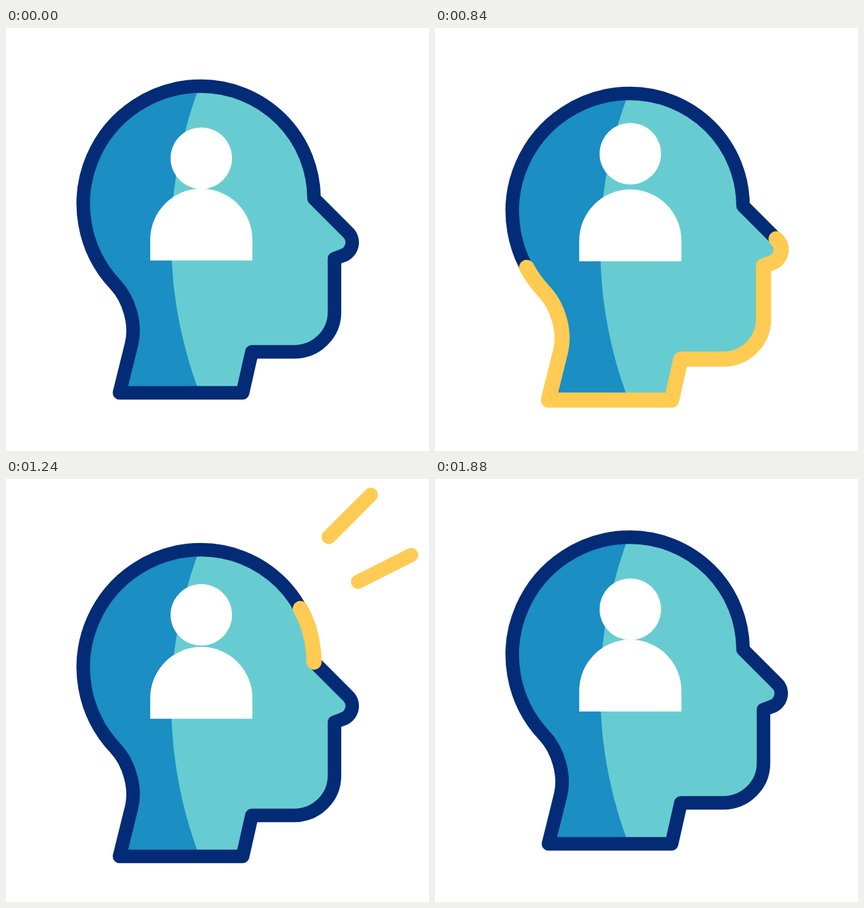
These frames come from a looping animation (640 px wide and 640 px high, 2200 ms). An HTML page:

```html
<!DOCTYPE html>
<html lang="en">
<head>
<meta charset="utf-8">
<title>Open mind</title>
<style>
  html, body { margin: 0; width: 100%; height: 100%; overflow: hidden; background: #fff; }
  svg { display: block; width: 100vw; height: 100vh; }
  .line { fill: none; stroke-linecap: round; stroke-linejoin: round; }
  .navy { stroke: #032b76; stroke-width: 20.5; }
  .glow { stroke: #ffcb52; stroke-width: 23; }
  .ray { stroke: #ffcb52; stroke-width: 21.5; }
</style>
</head>
<body>
<svg viewBox="0 0 640 640">
  <defs>
    <path id="shape" d="M466 258 L517 309 A21 21 0 0 1 508 344.8 L497 349 V430
      A61 60 0 0 1 436 490 H372 L358 552 H171.7 L190 478
      C197 449 187 411 165.3 388 A178 178 0 0 1 295 88 A171 170 0 0 1 466 258 Z"/>
    <clipPath id="inside"><use href="#shape"/></clipPath>
  </defs>
  <g id="skull">
    <use href="#shape" fill="#1b8ec3"/>
    <g clip-path="url(#inside)"><circle cx="901" cy="320" r="651" fill="#67ccd1"/></g>
    <use href="#shape" class="line navy"/>
    <path id="glow" class="line glow"/>
  </g>
  <circle id="face" cx="295.5" cy="197" r="46.5" fill="#fff"/>
  <path id="torso" d="M218.2 351.7 V320.3 A77.3 77.3 0 0 1 372.8 320.3 V351.7 Z" fill="#fff"/>
  <path id="ray1" class="line ray" d="M453 123 L552 24"/>
  <path id="ray2" class="line ray" d="M488 178 L613 115"/>
</svg>
<script>
const LOOP = 2200;
const $ = id => document.getElementById(id);
const [shape, skull, glow, face, torso, ray1, ray2] =
  ['shape', 'skull', 'glow', 'face', 'torso', 'ray1', 'ray2'].map($);
glow.setAttribute('d', shape.getAttribute('d'));

const span = (t, a, b) => Math.min(1, Math.max(0, (t - a) / (b - a)));

// Easing with handles at (x1, 0) and (x2, 1), solved by bisection
function ease(u, x1 = 1 / 3, x2 = 2 / 3) {
  if (u <= 0 || u >= 1) return u;
  let lo = 0, hi = 1, s;
  for (let i = 0; i < 30; i++) {
    s = (lo + hi) / 2;
    const x = 3 * (1 - s) ** 2 * s * x1 + 3 * (1 - s) * s * s * x2 + s ** 3;
    if (x < u) lo = s; else hi = s;
  }
  return s * s * (3 - 2 * s);
}

// Smooth curve through [time, value] keys, without overshoot
function curve(keys, t) {
  const last = keys.length - 1;
  if (t <= keys[0][0]) return keys[0][1];
  if (t >= keys[last][0]) return keys[last][1];
  const rate = i => (keys[i + 1][1] - keys[i][1]) / (keys[i + 1][0] - keys[i][0]);
  const slope = i => {
    if (i === 0 || i === last) return 0;
    const a = rate(i - 1), b = rate(i);
    return a * b <= 0 ? 0 : 2 * a * b / (a + b);
  };
  let i = 0;
  while (t > keys[i + 1][0]) i++;
  const [t0, v0] = keys[i], [t1, v1] = keys[i + 1];
  const h = t1 - t0, u = (t - t0) / h, w = 1 - u;
  return v0 * w * w * (1 + 2 * u) + v1 * u * u * (3 - 2 * u)
    + h * u * w * (slope(i) * w - slope(i + 1) * u);
}

const faceKeys = [[400, 0], [790, -7.5], [840, -6.8], [1090, 11.3], [1120, 11], [1360, 6], [1560, 3.2], [1880, 0]];
const torsoKeys = [[400, 0], [840, 1.3], [1085, 15.8], [1120, 15.4], [1360, 6.5], [1560, 3.1], [1880, 0]];

const shift = (el, y) => el.setAttribute('transform', `translate(0 ${y.toFixed(3)})`);

function trim(el, from, to) {
  const len = el.getTotalLength();
  const shown = to - from > 0.0005;
  el.style.display = shown ? '' : 'none';
  if (!shown) return;
  el.setAttribute('stroke-dasharray', `${(to - from) * len} ${len * 2}`);
  el.setAttribute('stroke-dashoffset', -from * len);
}

function draw(t) {
  const sink = ease(span(t, 400, 1080), 0.59, 0.77);
  const rise = ease(span(t, 1080, 1880), 0.45, 0.28);
  shift(skull, 21 * (sink - rise));
  shift(face, curve(faceKeys, t));
  shift(torso, curve(torsoKeys, t));

  trim(glow, ease(span(t, 740, 1400), 0.45, 0.35), ease(span(t, 460, 1160), 0.65, 0.4));

  const tail = ease(span(t, 1120, 1420)), tip = ease(span(t, 960, 1220));
  trim(ray1, tail, tip);
  trim(ray2, tail, tip);
}

const start = performance.now();
function tick() {
  draw((performance.now() - start) % LOOP);
  requestAnimationFrame(tick);
}
draw(0);
requestAnimationFrame(tick);
</script>
</body>
</html>
```
